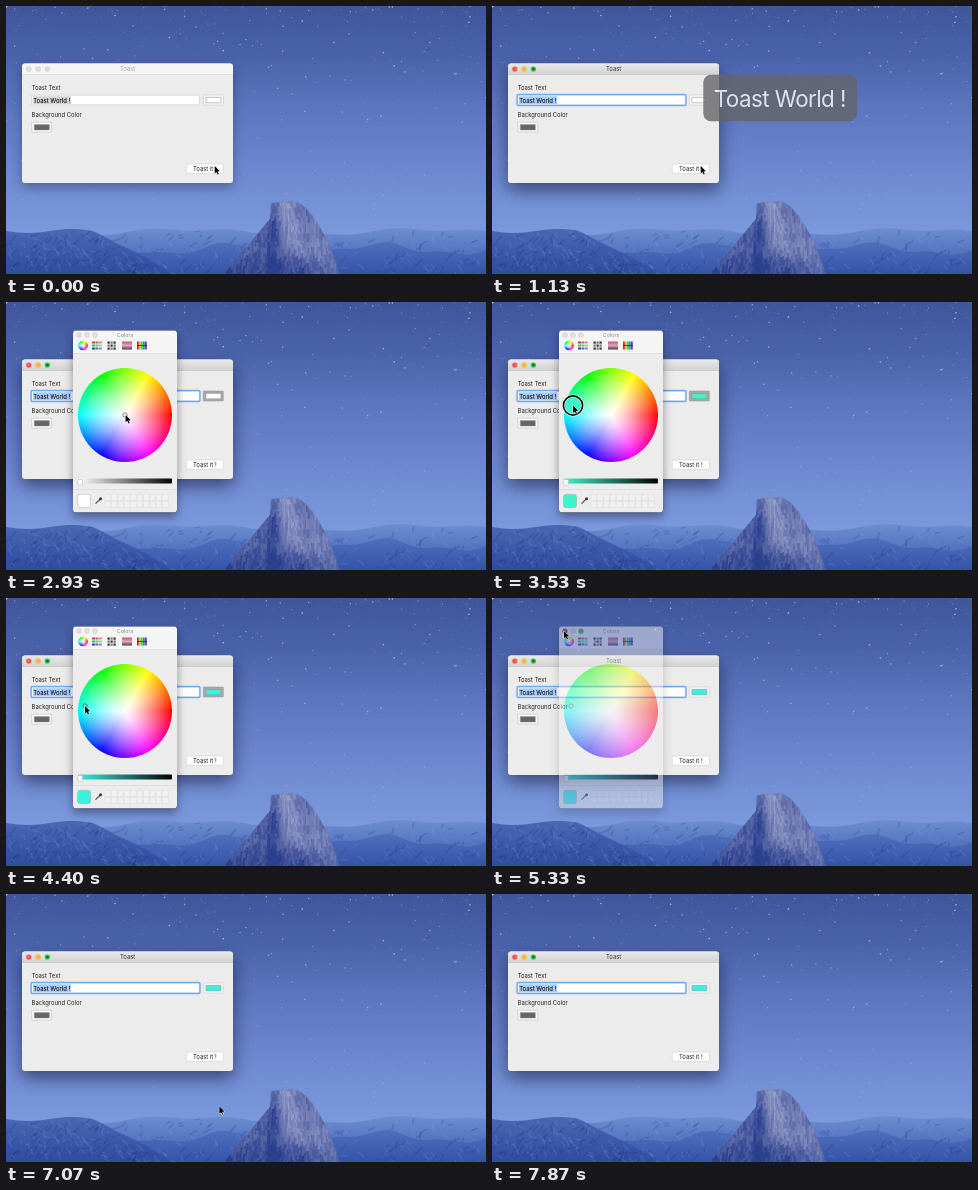
Animation of 480 by 268 pixels, one loop 7.94 s. Source, as an HTML page with a canvas:

```html
<!DOCTYPE html>
<html lang="en">
<head>
<meta charset="utf-8">
<title>Toast</title>
<style>
html, body { margin: 0; width: 480px; height: 268px; overflow: hidden; background: #4a67ae; }
canvas { display: block; }
</style>
</head>
<body>
<canvas id="stage" width="480" height="268"></canvas>
<script>
const LOOP = 7940, W = 480, H = 268;
const ctx = document.getElementById('stage').getContext('2d');

const clamp = v => Math.max(0, Math.min(1, v));
const ramp = (t, a, b) => clamp((t - a) / (b - a));
const smooth = u => u * u * (3 - 2 * u);
const mix = (a, b, u) => a + (b - a) * u;
const between = (t, a, b) => t >= a && t < b;
const pulse = (t, start, end) => ramp(t, start, start + 210) * (1 - ramp(t, end, end + 340));

function makeLayer() {
  const c = document.createElement('canvas');
  c.width = W;
  c.height = H;
  return c.getContext('2d');
}

function makeRandom(seed) {
  return () => (seed = (seed * 16807) % 2147483647) / 2147483647;
}

function linear(g, x0, y0, x1, y1, ...colors) {
  const fill = g.createLinearGradient(x0, y0, x1, y1);
  colors.forEach((c, i) => fill.addColorStop(i / (colors.length - 1), c));
  return fill;
}

function paint(g, fill, stroke, line) {
  if (fill) { g.fillStyle = fill; g.fill(); }
  if (stroke) { g.strokeStyle = stroke; g.lineWidth = line; g.stroke(); }
}

function box(g, x, y, w, h, r, fill, stroke, line = 0.5) {
  g.beginPath();
  g.roundRect(x, y, w, h, r);
  paint(g, fill, stroke, line);
}

function disc(g, x, y, r, fill, stroke, line = 0.5) {
  g.beginPath();
  g.arc(x, y, r, 0, Math.PI * 2);
  paint(g, fill, stroke, line);
}

function label(g, text, x, y, color = '#222', align = 'left', size = 5.9, weight = 400) {
  g.font = `${weight} ${size}px Inter, "Open Sans", sans-serif`;
  g.textAlign = align;
  g.fillStyle = color;
  g.fillText(text, x, y);
}

// Desktop: starry sky, hazy ridges and a granite dome
const random = makeRandom(4217);

function stars(g) {
  for (let i = 0; i < 700; i++) {
    const x = random() * W, y = random() ** 1.8 * 210, bright = random() ** 4;
    g.fillStyle = `rgba(200,215,255,${(0.16 + bright * 0.7) * (1 - y / 300)})`;
    const size = 0.8 + bright * 0.6;
    g.fillRect(x, y, size, size);
  }
}

function clipBelow(g, profile) {
  g.beginPath();
  g.moveTo(0, H);
  for (let x = 0; x <= W; x++) g.lineTo(x, profile(x));
  g.lineTo(W, H);
  g.clip();
}

function ridge(g, profile, top, bottom, roughness) {
  g.save();
  clipBelow(g, profile);
  g.fillStyle = linear(g, 0, 221, 0, H, top, bottom);
  g.fillRect(0, 200, W, H);
  g.lineWidth = 1.6;
  for (let i = 0; i < roughness; i++) {
    const x = random() * W, y = profile(x) + random() * 36, lit = random() < 0.45;
    g.strokeStyle = lit ? 'rgba(125,155,222,.2)' : 'rgba(28,48,122,.2)';
    g.beginPath();
    g.moveTo(x, y);
    g.lineTo(x + (lit ? 7 : -8) * random(), y + 1 + random() * 7);
    g.stroke();
  }
  g.restore();
}

function domeTop(x) {
  if (x > 284) return 195 + 73 * ((x - 284) / 50) ** 2;
  if (x > 264) return 195 + 3 * ((284 - x) / 20) ** 2;
  return 213 + 1.2 * (264 - x);
}

function domeLight(x, y) {
  const face = Math.exp(-(((x - 285 - (y - 220) * 0.2) / 13) ** 2)) * (1 - ramp(y, 236, 256));
  const cliff = Math.exp(-(((x - 267) / 5) ** 2)) * ramp(y, 204, 216);
  const rightSide = 0.25 * ramp(x, 294, 308);
  return 0.3 + 0.45 * face - 0.3 * cliff + rightSide - 0.2 * ramp(y, 242, 262);
}

function dome(g) {
  g.save();
  clipBelow(g, domeTop);
  for (let x = 216; x < 336; x += 1.5) {
    for (let y = 194; y < H;) {
      const length = 2 + random() * 7;
      const k = clamp(domeLight(x, y) + (random() - 0.5) * 0.32);
      g.fillStyle = `rgb(${mix(44, 160, k)},${mix(64, 167, k)},${mix(142, 206, k)})`;
      g.fillRect(x + (y - 220) * (x - 280) * 0.004, y, 2.4, length + 0.5);
      y += length;
    }
  }
  g.restore();
}

function paintDesktop() {
  const g = makeLayer();
  g.fillStyle = linear(g, 0, 0, 0, 240, '#3f569a', '#4962aa', '#5a74bd', '#6881cb', '#7390d6', '#7d9bdc');
  g.fillRect(0, 0, W, H);
  stars(g);
  ridge(g, x => 226 + 3 * Math.sin(x / 38) + 1.5 * Math.sin(x / 13), '#6f8fd2', '#3d5cb0', 180);
  ridge(g, x => 243 + 5 * Math.sin(x / 23 + 1) + 2 * Math.sin(x / 9), '#5c7cc6', '#3554a8', 200);
  ridge(g, x => 225 + 2 * Math.sin(x / 14) + 45 * ramp(x, 85, 165) ** 1.3, '#4b69b5', '#2f4c9e', 500);
  dome(g);
  return g.canvas;
}

// Main window
function trafficLights(g, x, y, step, colors) {
  colors.forEach((c, i) => disc(g, x + i * step, y, 2.6, c, 'rgba(0,0,0,.12)', 0.4));
}

function colorWell(x, y, color, pressed) {
  box(ctx, x, y, 20, 10, 0.5, pressed ? '#a9a9a9' : '#f8f8f8', pressed ? '#909090' : '#bcbcbc');
  box(ctx, x + 2.6, y + 2.4, 15, 5.4, 0, color, '#8b8b8b');
}

function drawWindow(active, textColor, wellPressed, buttonPressed) {
  ctx.save();
  ctx.shadowColor = `rgba(0,0,20,${active ? 0.5 : 0.3})`;
  ctx.shadowBlur = active ? 18 : 11;
  ctx.shadowOffsetY = active ? 7 : 4;
  box(ctx, 16, 57.5, 211, 119.5, 3, '#ececec');
  ctx.restore();
  box(ctx, 16, 57.5, 211, 11, [3, 3, 0, 0], active ? linear(ctx, 0, 57, 0, 68, '#e9e9e9', '#d4d4d4') : '#f5f5f5');
  box(ctx, 16, 68, 211, 0.5, 0, active ? '#b8b8b8' : '#d6d6d6');
  trafficLights(ctx, 22.8, 63, 9.3, active ? ['#fc5b57', '#fdbc40', '#34c84a'] : Array(3).fill('#dcdcdc'));
  if (active) disc(ctx, 41.4, 63, 1.2, '#0b6b20');
  label(ctx, 'Toast', 121.6, 65.1, active ? '#333' : '#aaa', 'center');

  label(ctx, 'Toast Text', 25.6, 84);
  if (active) box(ctx, 25.2, 88.7, 168.6, 10.6, 1, null, '#74a9ee', 1.8);
  box(ctx, 25.7, 89.2, 167.6, 9.6, 0, '#fff', active ? '#7aaae6' : '#bdbdbd');
  box(ctx, 27, 90.3, 38, 7.8, 0, active ? '#a8cdfc' : '#d4d4d4');
  label(ctx, 'Toast World !', 27.2, 96.6, '#111', 'left', 5.9, 500);
  colorWell(197.3, 89, textColor, wellPressed);

  label(ctx, 'Background Color', 25.6, 110.5);
  colorWell(25.7, 116.2, '#666', false);

  box(ctx, 180.3, 158, 37.2, 9.3, 2, buttonPressed ? '#dedede' : '#fff', '#c4c4c4');
  label(ctx, 'Toast it !', 198.8, 164.8, '#222', 'center');
}

// Colour panel
const PANEL = [67, 28.5, 104, 182];
const WHEEL = { x: 119, y: 113, r: 47 };
const panelLayer = makeLayer();

function hueWheel(g, x, y, r) {
  const hues = g.createConicGradient(0, x, y);
  for (let i = 0; i <= 12; i++) hues.addColorStop(i / 12, `hsl(${360 - i * 30},100%,50%)`);
  disc(g, x, y, r, hues);
  const white = g.createRadialGradient(x, y, 0, x, y, r);
  for (let u = 0; u <= 1; u += 0.25) white.addColorStop(u, `rgba(255,255,255,${1 - u ** 1.25})`);
  disc(g, x, y, r, white);
}

function wheelColor([x, y]) {
  const dx = x - WHEEL.x, dy = WHEEL.y - y;
  const hue = (Math.atan2(dy, dx) * 180 / Math.PI + 360) % 360;
  const sat = clamp(Math.hypot(dx, dy) / WHEEL.r) * 0.9, value = 1 - 0.06 * sat;
  const channel = n => {
    const k = (n + hue / 60) % 6;
    return Math.round(255 * value * (1 - sat * clamp(Math.min(k, 4 - k))));
  };
  return `rgb(${channel(5)},${channel(3)},${channel(1)})`;
}

function toolbarIcons(g) {
  hueWheel(g, 77, 43.5, 4.8);
  for (let i = 0; i < 9; i++) {
    const col = i % 3, row = (i - col) / 3;
    box(g, 86 + col * 3.4, 39.5 + row * 3, 3, 2, 0, `hsl(${row * 120},55%,${50 + col * 10}%)`);
    box(g, 101.5 + col * 3, 39.5 + row * 3, 2.2, 2.2, 0, i % 2 ? '#777' : '#333');
  }
  box(g, 116, 39.5, 10, 8, 0, linear(g, 0, 39, 0, 48, '#c84d70', '#e0a5b5', '#342b4a'));
  for (let i = 0; i < 5; i++) box(g, 131 + i * 2, 39.5, 1.8, 8, 0, `hsl(${i * 68},65%,50%)`);
  box(g, 131, 43, 10, 1, 0, 'rgba(20,20,20,.65)');
}

function paintPanel(g, color, marker, hover, picking) {
  g.clearRect(0, 0, W, H);
  box(g, ...PANEL, 3, '#ececec');
  box(g, 67, 28.5, 104, 23, [3, 3, 0, 0], '#f5f5f5');
  for (const y of [51.3, 187]) box(g, 67, y, 104, 0.5, 0, '#d4d4d4');
  trafficLights(g, 73, 33, 8, hover ? ['#b93a3c', '#dcdcdc', '#34b84a'] : Array(3).fill('#dedede'));
  label(g, 'Colors', 119, 34.7, '#8b8b8b', 'center', 5.4);
  toolbarIcons(g);

  hueWheel(g, WHEEL.x, WHEEL.y, WHEEL.r);
  if (!picking) disc(g, ...marker, 2.2, color, '#555', 0.7);

  box(g, 72, 176.4, 94, 5, 1, linear(g, 72, 0, 166, 0, color, '#000'));
  box(g, 71.8, 177.4, 4.6, 6, 1, '#fff', '#aaa');
  box(g, 71.5, 192.3, 13, 13.4, 2.5, color, '#aaa');

  g.beginPath();
  g.moveTo(89.5, 201.7);
  g.lineTo(93.7, 197.5);
  paint(g, null, '#555', 1.2);
  disc(g, 94.5, 196.8, 1.5, '#333');
  for (let i = 0; i < 20; i++) {
    box(g, 99 + (i % 10) * 6.4, 192.5 + Math.floor(i / 10) * 6.8, 5.6, 6, 0, '#f1f1f1', '#d3d3d3', 0.4);
  }
}

// Keeps the shadow outside the panel, so a fading panel stays clear
function panelShadow() {
  ctx.beginPath();
  ctx.rect(0, 0, W, H);
  ctx.roundRect(...PANEL, 3);
  ctx.clip('evenodd');
  ctx.shadowColor = 'rgba(0,0,20,.4)';
  ctx.shadowBlur = 10;
  ctx.shadowOffsetY = 4;
  box(ctx, ...PANEL, 3, '#000');
}

function drawPanel(alpha, color, marker, hover, picking) {
  if (!alpha) return;
  paintPanel(panelLayer, color, marker, hover, picking);
  ctx.save();
  ctx.globalAlpha = alpha;
  ctx.drawImage(panelLayer.canvas, 0, 0);
  panelShadow();
  ctx.restore();
  if (picking) {
    disc(ctx, ...marker, 9.6, color, '#f4f4f4', 2.6);
    disc(ctx, ...marker, 9.6, null, '#080808', 1.6);
  }
}

// Toast: plate and text fade as one
const toastLayer = makeLayer();

function drawToast(alpha, color) {
  if (!alpha) return;
  const g = toastLayer;
  g.clearRect(0, 0, W, H);
  box(g, 211.3, 68.7, 153.8, 46.5, 7.5, '#656567');
  g.letterSpacing = '-0.55px';
  label(g, 'Toast World !', 287.8, 100.8, color, 'center', 22.4);
  ctx.save();
  ctx.globalAlpha = alpha;
  ctx.drawImage(g.canvas, 0, 0);
  ctx.restore();
}

// Pointer: rests at a spot between its arrival and departure
const BUTTON = [208.7, 160], WELL = [206, 95], CENTER = [WHEEL.x, WHEEL.y];
const TEAL = [81, 103.5], CYAN = [79, 108], CLOSE = [72, 33], BUTTON_LEFT = [193.5, 161], AWAY = [238, 276];
const stops = [
  [0, 1250, BUTTON], [1950, 2550, WELL], [2950, 3080, CENTER], [3500, 3670, TEAL],
  [4070, 4400, CYAN], [5100, 5380, CLOSE], [5930, 6700, BUTTON_LEFT], [7500, LOOP, AWAY]
];

function pointerAt(t) {
  const i = stops.findIndex(([, leave]) => t < leave);
  const [arrive, , to] = stops[i];
  if (t >= arrive) return to;
  const [leave, from] = stops[i - 1].slice(1);
  const u = smooth(ramp(t, leave, arrive));
  return from.map((v, axis) => mix(v, to[axis], u));
}

function drawPointer([x, y]) {
  ctx.save();
  ctx.translate(x, y);
  ctx.fillStyle = '#000';
  ctx.strokeStyle = '#fff';
  ctx.lineWidth = 1;
  const arrow = new Path2D('M0 0V7.4L1.7 5.9L2.9 8.5L4.1 8L2.9 5.5L5.2 5.3Z');
  ctx.stroke(arrow);
  ctx.fill(arrow);
  ctx.restore();
}

const desktop = paintDesktop();

function render(t) {
  const picked = t >= 3080;
  const marker = picked ? pointerAt(Math.min(t, 4200)) : CENTER;
  const color = picked ? wheelColor(marker) : '#fff';
  const panelAlpha = ramp(t, 2400, 2600) * (1 - ramp(t, 5270, 5390));

  ctx.drawImage(desktop, 0, 0);
  drawWindow(t >= 140, color, between(t, 2200, 5270), between(t, 200, 330) || between(t, 5950, 6060));
  drawPanel(panelAlpha, color, marker, between(t, 4950, 5400), between(t, 3080, 4070));
  drawToast(pulse(t, 470, 1060), '#fff');
  drawToast(pulse(t, 6060, 6650), '#40ffdc');
  drawPointer(pointerAt(t));
}

const start = performance.now();
function tick() {
  render((performance.now() - start) % LOOP);
  requestAnimationFrame(tick);
}
tick();
</script>
</body>
</html>
```
